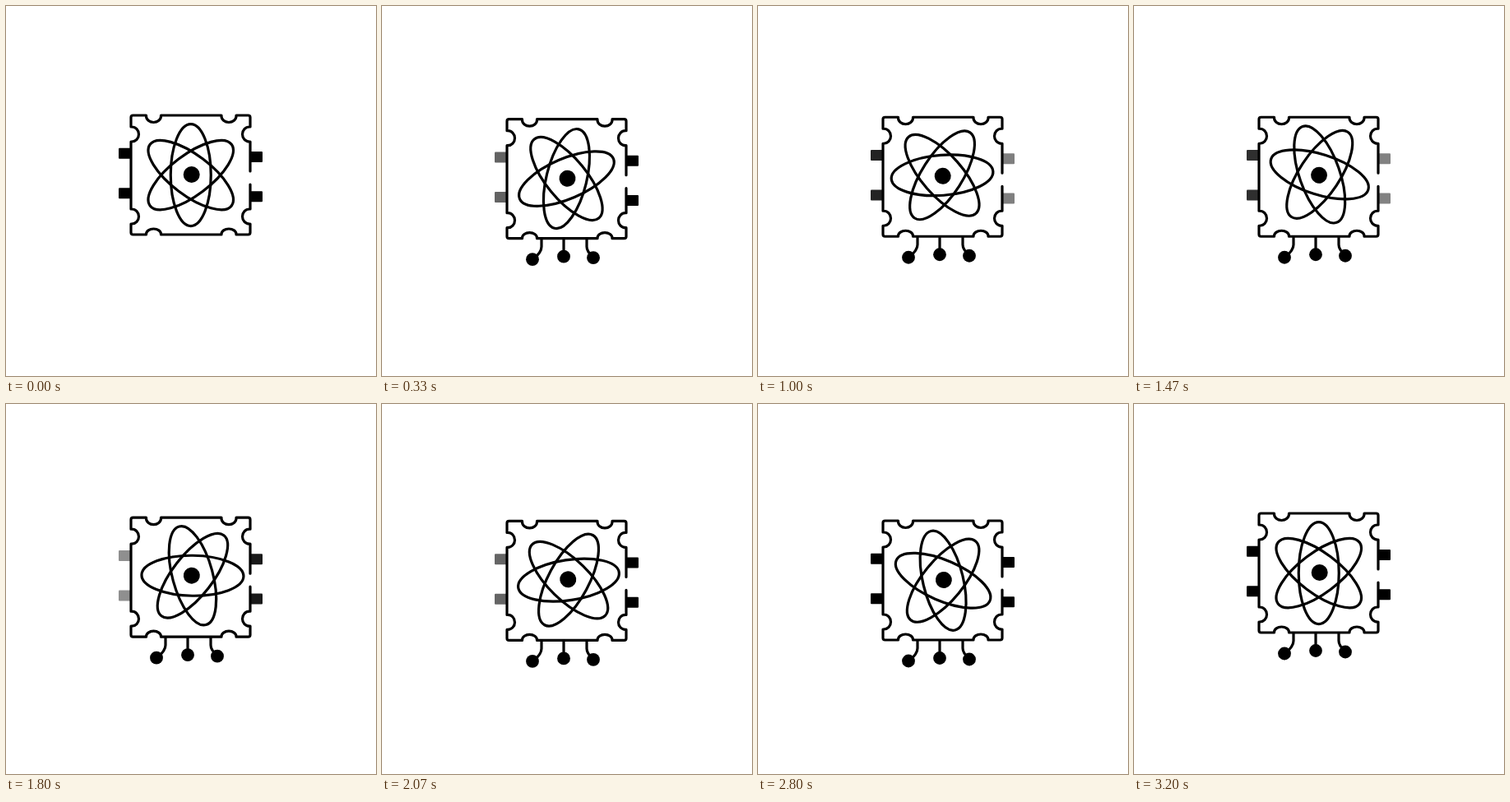
Animation, 450 px wide and 450 px high, one loop 3.27 s. Source, as an HTML page:

```html
<!DOCTYPE html>
<html lang="en">
<head>
<meta charset="utf-8">
<title>Atom chip</title>
<style>
  html, body { margin: 0; width: 100%; height: 100%; overflow: hidden; background: #fff; }
  svg { display: block; width: 100vw; height: 100vh; }
  .line { fill: none; stroke: #000; stroke-width: 3.2; stroke-linecap: round; stroke-linejoin: round; }
</style>
</head>
<body>
<svg viewBox="0 0 450 450">
  <g id="chip">
    <g id="left">
      <rect x="137" y="172.8" width="15" height="13" rx="1"/>
      <rect x="137" y="221.3" width="15" height="13" rx="1"/>
    </g>
    <g id="right">
      <rect x="297" y="177" width="15" height="13" rx="1"/>
      <rect x="297" y="225.3" width="15" height="13" rx="1"/>
    </g>

    <path class="line" d="
      M297 201 V165 h-1 a8.5 9 0 0 1 0 -18 h1 V135.5 q0 -2.5 -2.5 -2.5
      H280 v1 a9 7.5 0 0 1 -18 0 v-1
      H188.5 v1 a9 7.5 0 0 1 -18 0 v-1
      H154.5 q-2.5 0 -2.5 2.5 V147 h1 a8.5 9 0 0 1 0 18 h-1
      V247 h1 a8.5 9 0 0 1 0 18 h-1 V275.5 q0 2.5 2.5 2.5
      H170.5 v-.5 a9 6.5 0 0 1 18 0 v.5
      H262 v-.5 a9 6.5 0 0 1 18 0 v.5
      H294.5 q2.5 0 2.5 -2.5 V265 h-1 a8.5 9 0 0 1 0 -18 h1 V217"/>

    <g id="legs">
      <path class="line" d="M194 279 V288 Q194 295 184 303 M221 279 V300 M249 279 V288 Q249 294 257 301"/>
      <circle cx="183" cy="303.5"/>
      <circle cx="221" cy="300"/>
      <circle cx="257" cy="301.5"/>
    </g>

    <g id="atom">
      <g class="line" transform="translate(-.75 1.4)">
        <ellipse rx="62" ry="24.5" transform="rotate(37)"/>
        <ellipse rx="62" ry="24.5" transform="rotate(90)"/>
        <ellipse rx="62" ry="24.5" transform="rotate(143)"/>
      </g>
      <circle cx=".2" cy=".8" r="10"/>
    </g>
  </g>
</svg>
<script>
  const LOOP = 3270, STEPS = 48, STEP_MS = 3200 / STEPS;
  const $ = id => document.getElementById(id);
  const chip = $('chip'), atom = $('atom'), legs = $('legs');
  const left = $('left'), right = $('right');
  const tips = legs.querySelectorAll('circle');

  // Turning points as [step, value], joined by cosine easing
  const BOB = [[0, 0], [6, 5], [12, -4.5], [18, 9], [24, 0], [30, 10.4], [36, -4.7], [42, 9], [48, 0]];
  const LEFT = [[0, 1], [8, .43], [18.5, 1], [27.5, .43], [37, 1]];
  const RIGHT = [[7.5, 1], [18.5, .35], [30, 1]];
  const TIP = [[4, 7.8], [10, 9.5], [15, 7.9]];

  const wave = u => (1 - Math.cos(Math.PI * u)) / 2;

  function along(knots, n) {
    if (n <= knots[0][0]) return knots[0][1];
    for (let i = 1; i < knots.length; i++) {
      const [a, from] = knots[i - 1], [b, to] = knots[i];
      if (n <= b) return from + (to - from) * wave((n - a) / (b - a));
    }
    return knots[knots.length - 1][1];
  }

  // One full turn that starts and ends slowly, with a small lead early on
  const turn = u => 360 * wave(u) + 56 * u * (1 - u) ** 3;

  function draw(ms) {
    // The picture advances in 15 fps steps
    const n = Math.min(STEPS, Math.floor((ms % LOOP + 5) / STEP_MS));
    chip.setAttribute('transform', `translate(0 ${along(BOB, n)})`);
    atom.setAttribute('transform', `translate(225.5 204.2) rotate(${turn(n / STEPS)})`);
    left.setAttribute('opacity', along(LEFT, n));
    right.setAttribute('opacity', along(RIGHT, n));
    legs.setAttribute('visibility', n ? 'visible' : 'hidden');
    tips.forEach(tip => tip.setAttribute('r', along(TIP, n)));
  }

  const start = performance.now();
  function tick() {
    draw(performance.now() - start);
    requestAnimationFrame(tick);
  }
  tick();
</script>
</body>
</html>
```
